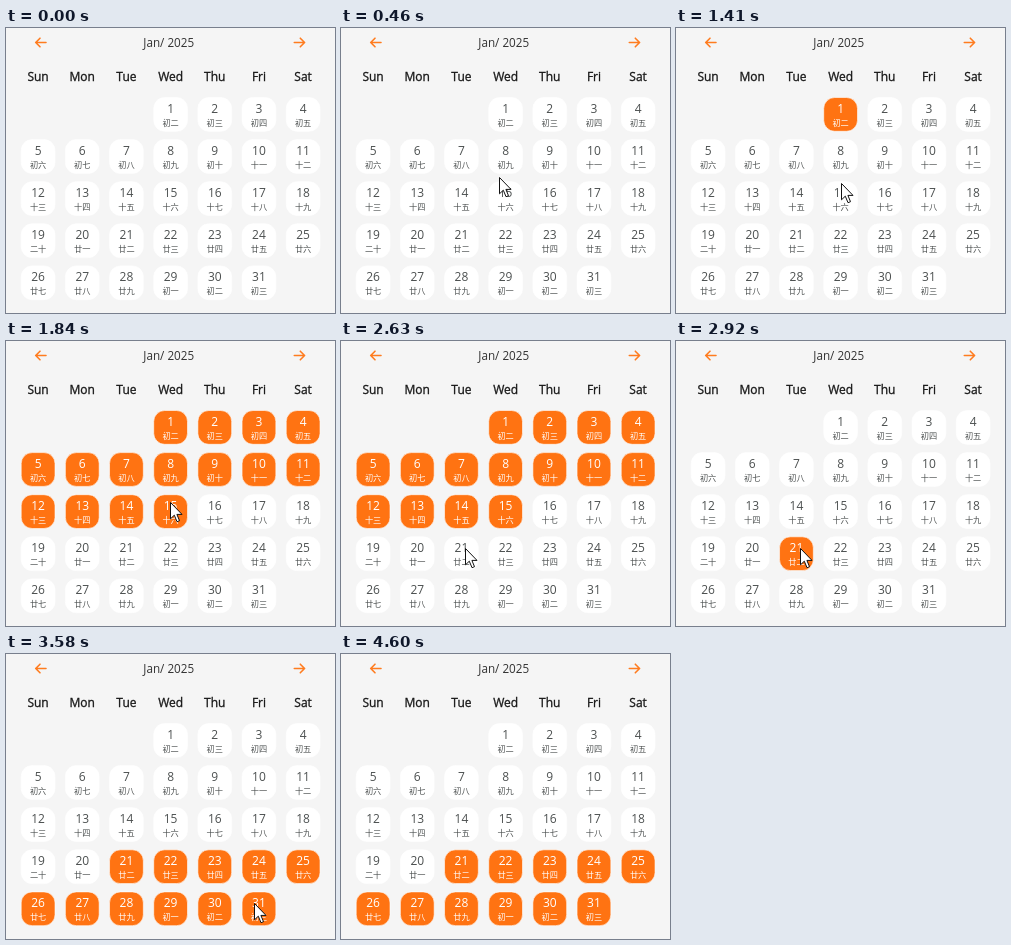
These frames come from a looping animation (329x285 px, 5.37 s). An HTML page:

```html
<!DOCTYPE html>
<html lang="en">
<head>
<meta charset="utf-8">
<title>Calendar range selection</title>
<style>
  html, body { margin: 0; width: 100%; height: 100%; overflow: hidden; background: #f5f5f5; }
  svg { display: block; }
  text { font: 12px "Open Sans", sans-serif; text-anchor: middle; fill: #333; }
  .title { font-size: 11.7px; }
  .week { fill: #181818; stroke: #181818; stroke-width: .3; }
  .day rect { fill: #fff; stroke: #fff; stroke-width: .6; }
  .day text { fill: #4c5050; }
  .day .lunar { font: 300 8.2px "Noto Sans CJK SC", "Noto Sans CJK", sans-serif; }
  .day.on rect { fill: #ff7312; }
  .day.on text { fill: #fff; }
  .arrow { fill: none; stroke: #ff7c1f; stroke-width: 1.6; stroke-linecap: round; stroke-linejoin: round; }
</style>
</head>
<body>
<svg id="stage" width="329" height="285" viewBox="0 0 329 285">
  <path class="arrow" d="M40 14.5H29.700M34 10.200l-4.300 4.300 4.300 4.300"/>
  <path class="arrow" d="M288.300 14.5h10.300M294.300 10.200l4.300 4.300-4.300 4.300"/>
  <text class="title" x="162.700" y="19">Jan/ 2025</text>
  <g id="grid"></g>
  <path id="cursor" d="M.5.5V16.800L4.300 13.200 7 19.700 9.500 18.700 6.900 12.400H12Z" fill="#fff" stroke="#111" stroke-linejoin="round"/>
</svg>
<script>
const LOOP = 5370;
const grid = document.getElementById('grid');
const cursor = document.getElementById('cursor');

function add(parent, tag, attrs, text = '') {
  const el = document.createElementNS('http://www.w3.org/2000/svg', tag);
  for (const key in attrs) el.setAttribute(key, attrs[key]);
  el.textContent = text;
  return parent.appendChild(el);
}

const columnX = col => 32.1 + 44.17 * col;

function lunarName(day) {
  const n = day % 29 + 1;
  if (day === 29) return '初一';
  if (n === 20) return '二十';
  return '初十廿'[n === 10 ? 0 : Math.floor(n / 10)] + '十一二三四五六七八九'[n % 10];
}

['Sun', 'Mon', 'Tue', 'Wed', 'Thu', 'Fri', 'Sat'].forEach((name, col) =>
  add(grid, 'text', { class: 'week', x: columnX(col), y: 52.5 }, name));

const days = Array.from({ length: 31 }, (_, i) => {
  const slot = i + 3;
  const x = columnX(slot % 7), y = 69.5 + 42.1 * Math.floor(slot / 7);
  const cell = add(grid, 'g', { class: 'day' });
  add(cell, 'rect', { x: x - 16.9, y, width: 33.8, height: 33.8, rx: 11 });
  add(cell, 'text', { x, y: y + 15.2 }, i + 1);
  add(cell, 'text', { class: 'lunar', x, y: y + 28.4 }, lunarName(i + 1));
  return cell;
});

// Selected range from each click on: [time, first day, last day]
const selections = [[0, 0, 0], [960, 1, 1], [1840, 1, 15], [2920, 21, 21], [3580, 21, 31]];

const smooth = u => u * u * (3 - 2 * u);
const speedUp = u => u ** 1.8;

// Pointer moves, sampled in equal steps along a quadratic curve
const moves = [
  { start: 180, end: 690, steps: 11, path: [[47, 247], [195, 150], [167, 91]], ease: smooth },
  { start: 740, end: 741, steps: 1, path: [[167, 90], [167, 90], [167, 90]], ease: smooth },
  { start: 960, end: 1470, steps: 11, path: [[167, 90], [167, 126], [164, 161]], ease: smooth },
  { start: 2163, end: 2630, steps: 10, path: [[164, 161], [146, 188], [123.5, 207]], ease: smooth },
  { start: 2920, end: 3340, steps: 9, path: [[123.5, 207], [182, 232], [248, 249]], ease: smooth },
  { start: 4465, end: 4555, steps: 2, path: [[248, 249], [165, 260], [82, 279]], ease: speedUp }
];

function pointerAt(t) {
  const { start, end, steps, path: [a, b, c], ease } = moves.findLast(m => t >= m.start);
  const progress = Math.min(1, (t - start) / (end - start));
  const u = ease(Math.floor(progress * steps + 0.01) / steps);
  return [0, 1].map(k => (1 - u) ** 2 * a[k] + 2 * u * (1 - u) * b[k] + u * u * c[k]);
}

function draw(t) {
  const [, first, last] = selections.findLast(s => t >= s[0]);
  days.forEach((cell, i) => cell.classList.toggle('on', i + 1 >= first && i + 1 <= last));

  const visible = t >= 180 && t < 4600;
  cursor.style.display = visible ? '' : 'none';
  if (visible) {
    const [x, y] = pointerAt(t).map(Math.round);
    cursor.setAttribute('transform', `translate(${x} ${y})`);
  }
}

const began = performance.now();
function tick() {
  draw((performance.now() - began) % LOOP);
  requestAnimationFrame(tick);
}
tick();
</script>
</body>
</html>
```
